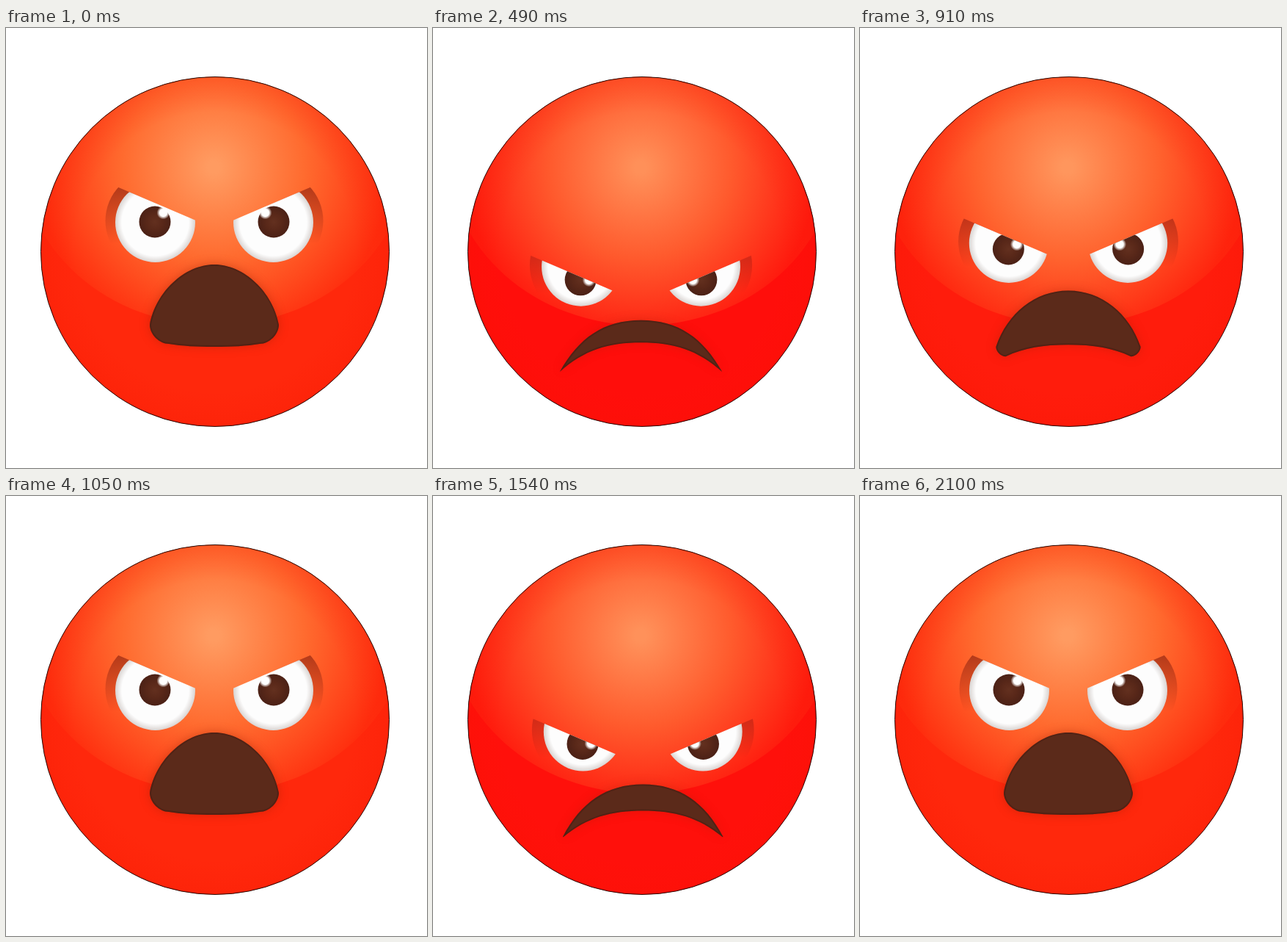
An HTML page with a canvas that plays this animation: 574 by 599 pixels, repeating every 2.17 s.

```html
<!DOCTYPE html>
<html lang="en">
<head>
<meta charset="utf-8">
<title>Angry face</title>
<style>
html, body { margin: 0; width: 100%; height: 100%; overflow: hidden; background: #fff; }
canvas { display: block; }
</style>
</head>
<body>
<canvas id="stage" width="574" height="599"></canvas>
<script>
const ctx = document.getElementById('stage').getContext('2d');
const LOOP = 2170, STEP = 70, CYCLE = LOOP / 2;
const CLOSE = 624, OPEN_FROM = 780, OPEN_TO = 1015;
const MID = 284, SLOPE = 0.427;

const lerp = (a, b, p) => a + (b - a) * p;
const ease = u => (1 - Math.cos(Math.PI * Math.min(1, Math.max(0, u)))) / 2;

// p runs from 0 (shouting) to 1 (frowning)
function pose(t) {
  const c = t % CYCLE;
  if (c >= CLOSE) return { p: 1 - ease((c - OPEN_FROM) / (OPEN_TO - OPEN_FROM)), sway: 0 };
  const swing = 3 * Math.sin(Math.PI * c / CLOSE);
  return { p: ease(c / CLOSE), sway: swing * Math.cos(2 * Math.PI * (c - 455) / 120) };
}

function radial(x, y, r0, r1, ...stops) {
  const g = ctx.createRadialGradient(x, y, r0, x, y, r1);
  stops.forEach((colour, i) => g.addColorStop(i / (stops.length - 1), colour));
  return g;
}

function oval(x, y, rx, ry, fill) {
  ctx.beginPath();
  ctx.ellipse(x, y, rx, ry, 0, 0, 2 * Math.PI);
  if (fill) {
    ctx.fillStyle = fill;
    ctx.fill();
  }
}

const disc = (x, y, r, fill) => oval(x, y, r, r, fill);

function drawHead(p) {
  const tone = (g0, g1, b0, b1) => `rgb(255,${lerp(g0, g1, p)},${lerp(b0, b1, p)})`;
  const head = fill => oval(285, 304.5, 237.5, 238, fill);
  ctx.save();
  head(tone(40, 11, 12, 11));
  ctx.clip();
  oval(285, 170, 265, 235, radial(283, 190, 8, 240,
    tone(155, 143, 97, 88), tone(107, 88, 47, 45), tone(46, 24, 14, 14)));
  head(radial(285, 304.5, 190, 238, 'rgba(255,20,0,0)', 'rgba(245,20,0,0.2)'));
  ctx.restore();
  head();
  ctx.strokeStyle = 'rgba(25,4,0,0.95)';
  ctx.lineWidth = 1;
  ctx.stroke();
}

// Fold of skin on the outer side of the eye
function drawFold(x, y, top, p) {
  const tone = `${lerp(150, 165, p)},${lerp(40, 25, p)},18`;
  const fade = ctx.createLinearGradient(0, top, 0, y + lerp(29, 37, p));
  fade.addColorStop(0, `rgba(${tone},${lerp(0.75, 0.4, p)})`);
  fade.addColorStop(1, `rgba(${tone},0)`);
  ctx.save();
  ctx.beginPath();
  ctx.rect(0, 0, x, 599);
  ctx.clip();
  disc(x, y - 2, lerp(68, 70, p), fade);
  ctx.restore();
}

function drawEye(p) {
  const x = lerp(203.5, 202, p), y = lerp(264.5, 332.5, p), r = lerp(54.5, 53.5, p);
  const lid = y + lerp(-26, 19, p);
  ctx.save();
  ctx.beginPath();
  ctx.moveTo(0, lid - SLOPE * x);
  ctx.lineTo(MID, lid + SLOPE * (MID - x));
  ctx.lineTo(MID, 599);
  ctx.lineTo(0, 599);
  ctx.clip();

  drawFold(x, y, lid - SLOPE * 58, p);
  disc(x, y, r, radial(x, y, r - 9, r, '#fdfdfd', '#d9d4d2'));

  const px = x - 0.5, py = y + lerp(-0.5, 20, p);
  disc(px, py, 21.5, radial(px, py, 0, 21.5, '#63301f', '#592819', '#4b2116'));
  const hx = px + 11.5, hy = py + lerp(-12.5, 2, p);
  disc(hx, hy, 9, radial(hx, hy, 5, 9, '#fff', 'rgba(255,255,255,0)'));
  ctx.restore();
}

// Left half from top to bottom as Bezier points, x from the middle
function mouthHalf(p) {
  const top = lerp(322, 407, p), bottom = lerp(434, 427.5, p);
  const w = lerp(88, 113.5, p), tip = lerp(404, 476, p);
  const round = 26 * Math.max(0, 1 - p / 0.85);
  const cx = round - w, cy = tip + round;
  return [
    [0, top], [-0.46 * w, top],
    [-w * lerp(0.91, 0.75, p), lerp(top, tip, lerp(0.46, 0.33, p))],
    [-w, tip], [-w, tip + round / 2], [cx - round / 2, cy], [cx, cy],
    [0.7 * cx, lerp(cy, bottom, 0.75)], [0.4 * cx, bottom], [0, bottom]
  ];
}

function drawMouth(p) {
  const left = mouthHalf(p);
  const right = left.map(([x, y]) => [-x, y]).reverse();
  ctx.beginPath();
  ctx.moveTo(MID, left[0][1]);
  for (const side of [left, right]) {
    for (let i = 1; i < side.length; i += 3) {
      ctx.bezierCurveTo(...side.slice(i, i + 3).flatMap(([x, y]) => [MID + x, y]));
    }
  }
  ctx.closePath();
  ctx.save();
  ctx.shadowColor = `rgba(150,30,0,${lerp(0.4, 0.25, p)})`;
  ctx.shadowBlur = 14;
  ctx.fillStyle = '#5b2a1a';
  ctx.fill();
  ctx.restore();
  ctx.save();
  ctx.clip();
  ctx.strokeStyle = 'rgba(60,22,12,0.35)';
  ctx.lineWidth = 4;
  ctx.stroke();
  ctx.restore();
}

function draw(t) {
  const { p, sway } = pose(t);
  ctx.fillStyle = '#fff';
  ctx.fillRect(0, 0, 574, 599);
  drawHead(p);
  ctx.save();
  ctx.translate(sway, 0);
  drawMouth(p);
  drawEye(p);
  ctx.translate(2 * MID, 0);
  ctx.scale(-1, 1);
  drawEye(p);
  ctx.restore();
}

const start = performance.now();
function tick() {
  const t = (performance.now() - start) % LOOP;
  draw(Math.floor(t / STEP) * STEP);
  requestAnimationFrame(tick);
}
tick();
</script>
</body>
</html>
```
